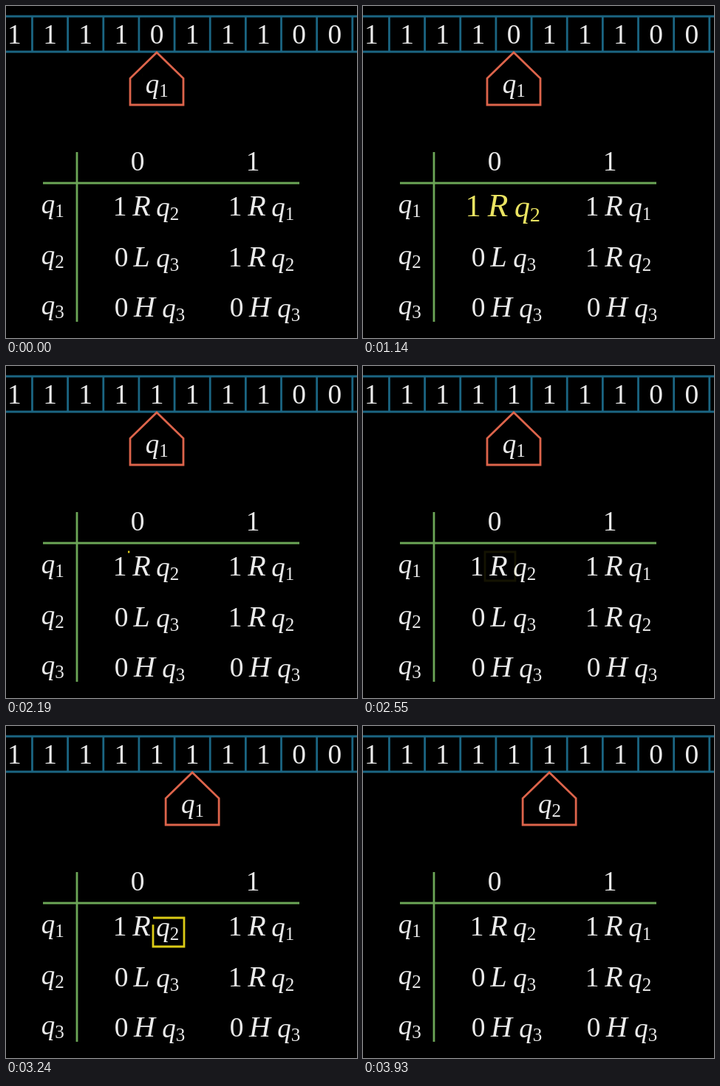
Recreate the animation shown at these times as an HTML page. Size 475 by 450 pixels, loop 3960 ms.

```html
<!DOCTYPE html>
<html lang="en">
<head>
<meta charset="utf-8">
<title>Turing machine step</title>
<style>
  html, body { margin: 0; width: 100%; height: 100%; overflow: hidden; background: #000; }
  svg { display: block; width: 475px; height: 450px; }
  text { font-family: "Liberation Serif", "Times New Roman", serif; text-anchor: middle; }
  .var { font-style: italic; }
  .line { fill: none; stroke-width: 2.8; }
</style>
</head>
<body>
<svg id="stage" viewBox="0 0 475 450" fill="#ebebeb"></svg>
<script>
const NS = 'http://www.w3.org/2000/svg';
const stage = document.getElementById('stage');
const LOOP = 3960;
const CELL = 48.15;

function add(parent, tag, attrs, text) {
  const el = document.createElementNS(NS, tag);
  for (const key in attrs) el.setAttribute(key, attrs[key]);
  if (text !== undefined) el.textContent = text;
  parent.appendChild(el);
  return el;
}

const group = () => add(stage, 'g', {});
const line = (d, stroke, parent = stage) => add(parent, 'path', { d, stroke, class: 'line' });
const digit = (parent, x, y, s) => add(parent, 'text', { x, y, 'font-size': 37.5 }, s);
const letter = (parent, x, y, s) =>
  add(parent, 'text', { x, y, 'font-size': 40, class: 'var' }, s);
const sub = (parent, x, y, s) => add(parent, 'text', { x, y: y + 5, 'font-size': 25 }, s);

// A state name; x is the centre of the q.
function state(parent, x, y, n) {
  add(parent, 'text', { x, y, 'font-size': 37, class: 'var' }, 'q');
  return sub(parent, x + 15.5, y, n);
}

// Tape, centred on the cell under the head
const cellX = i => 204 + CELL * (i - 4);
let grid = 'M-12 14H480M-12 62H480';
for (let i = 0; i < 10; i++) grid += `M${cellX(i + 0.5)} 14V62`;
line(grid, '#1b6582');
[...'1111011100'].forEach((s, i) => { if (i !== 4) digit(stage, cellX(i), 51, s); });
const oldCell = digit(stage, cellX(4), 51, '0');
const newCell = digit(stage, cellX(4), 51, '1');

// Head
const head = group();
line('M204 63L240 98V134H168V98Z', '#dd644b', head);
const oldState = state(head, 198, 118, '1');
const newState = sub(head, 213.5, 118, '2');

// Rule table
line('M50 240H397M96 198V428', '#6ca657');
digit(stage, 178, 223, '0');
digit(stage, 334, 223, '1');
[281, 350, 418].forEach((y, i) => state(stage, 57, y, i + 1));

function rule(dx, y, write, move, next) {
  const g = group();
  const wide = move === 'H' ? 8 : 0;
  digit(g, (write === '1' ? 154 : 156) + dx, y, write);
  letter(g, 183.5 + dx + wide / 2, y, move);
  state(g, 212.5 + dx + wide, y + 1, next);
  return g;
}
const active = rule(0, 284, '1', 'R', 2);
rule(156, 284, '1', 'R', 1);
rule(0, 353, '0', 'L', 3);
rule(156, 353, '1', 'R', 2);
rule(0, 421, '0', 'H', 3);
rule(156, 421, '0', 'H', 3);

// Marker boxes: left, top, right, bottom, start, duration
const boxes = [
  [188, 17, 220, 59, 0, 822],
  [184, 93, 225, 131, 0, 822],
  [142, 254, 166, 290, 1268, 448],
  [165, 252, 206, 291, 2165, 448],
  [199, 260, 241, 299, 3068, 450]
].map(([l, t, r, b, start, span]) => {
  const el = line(`M${l} ${t}H${r}V${b}H${l}Z`, '#dccb16');
  el.setAttribute('pathLength', 1);
  return { el, start, span };
});

const clamp = v => Math.min(1, Math.max(0, v));
const sigmoid = v => 1 / (1 + Math.exp(-v));
const edge = sigmoid(-5);
const smooth = v => clamp((sigmoid(10 * (clamp(v) - 0.5)) - edge) / (1 - 2 * edge));
const ease = (t, start, span) => smooth((t - start) / span);

function swap(from, to, p) {
  from.setAttribute('opacity', 1 - p);
  to.setAttribute('opacity', p);
}

function draw(t) {
  for (const { el, start, span } of boxes) {
    const drawn = ease(t, start, span / 2);
    const faded = ease(t, start + span / 2, span / 2);
    el.setAttribute('stroke-dasharray', drawn < 1 ? `${drawn} 2` : 'none');
    el.setAttribute('opacity', drawn > 0 ? 1 - faded : 0);
  }

  // The active rule swells and turns yellow, then returns.
  const k = clamp((t - 822) / 446);
  const glow = smooth(1 - Math.abs(2 * k - 1));
  active.setAttribute('transform',
    `translate(191 275) scale(${1 + 0.2 * glow}) translate(-191 -275)`);
  active.setAttribute('fill', `rgb(235,${Math.round(235 - 10 * glow)},${Math.round(235 - 205 * glow)})`);

  swap(oldCell, newCell, ease(t, 1716, 448));
  head.setAttribute('transform', `translate(${CELL * ease(t, 2638, 440)} 0)`);
  swap(oldState, newState, ease(t, 3518, 420));
}

const origin = performance.now();
function tick() {
  draw((performance.now() - origin) % LOOP);
  requestAnimationFrame(tick);
}
tick();
</script>
</body>
</html>
```
